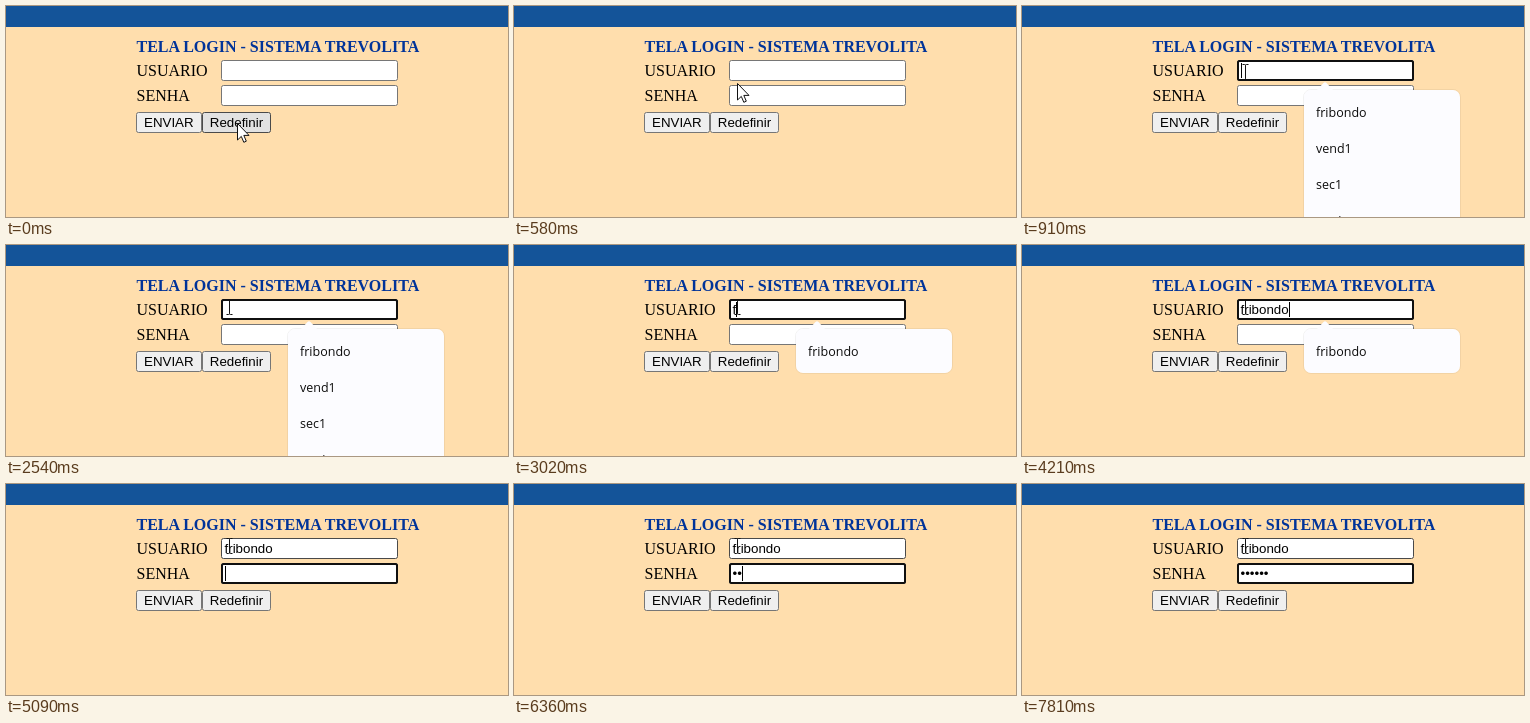
Write an HTML page that moves like this. It is 502 by 211 pixels and loops after 8000 ms.

```html
<!DOCTYPE html>
<html lang="pt">
<head>
<meta charset="utf-8">
<title>Login</title>
<style>
  html, body { margin: 0; width: 100%; height: 100%; overflow: hidden; background: #ffdead; }
  svg { display: block; width: 502px; height: 211px; }
  text { white-space: pre; }
  .serif { font: 16px "Liberation Serif", serif; }
  .title { font-weight: bold; fill: #039; }
  .sans { font: 13.333px "Liberation Sans", sans-serif; }
  .menu text { font: 12.5px "Open Sans", sans-serif; fill: #0c0c0c; }
  .menu path, .menu rect { fill: #fcfcff; }
  .menu .edge { fill: none; stroke: #000; stroke-opacity: .05; }
  .box { fill: #fff; stroke: #767676; }
  .button { fill: #efefef; stroke: #767676; }
  .box.hover { stroke: #4a4a4a; }
  .button.hover { fill: #e2e2e2; stroke: #4a4a4a; }
  .ring { fill: none; stroke: #101010; stroke-width: 2; }
</style>
</head>
<body>
<svg viewBox="0 0 502 211">
  <rect width="502" height="211" fill="#ffdead"/>
  <rect width="502" height="21" fill="#145499"/>

  <text class="serif title" x="130.5" y="46">TELA LOGIN - SISTEMA TREVOLITA</text>
  <text class="serif" x="130.5" y="70">USUARIO</text>
  <text class="serif" x="130.5" y="95">SENHA</text>

  <rect id="user" class="box" x="215.5" y="54.5" width="176" height="20" rx="2"/>
  <rect id="pass" class="box" x="215.5" y="79.5" width="176" height="20" rx="2"/>
  <rect id="ring" class="ring" x="216" width="175" height="19" rx="1.5"/>
  <text id="userText" class="sans" x="218.5" y="69"></text>
  <text id="passText" class="sans" x="218.5" y="94"></text>
  <rect id="caret" width="1" height="15"/>

  <rect class="button" x="130.5" y="106.5" width="65" height="20" rx="2"/>
  <rect id="reset" class="button" x="196.5" y="106.5" width="68" height="20" rx="2"/>
  <text class="sans" x="138" y="121">ENVIAR</text>
  <text class="sans" x="203.8" y="121">Redefinir</text>

  <g id="menu" class="menu">
    <rect id="edge" class="edge" x="281.5" y="83.5" width="157" rx="7.5"/>
    <path d="M294 85L301.5 77Q303 75.6 304.5 77L312 85Z"/>
    <rect id="panel" x="282" y="84" width="156" rx="7"/>
    <text x="294" y="110.5">fribondo</text>
    <g id="more">
      <text x="294" y="146.5">vend1</text>
      <text x="294" y="182.5">sec1</text>
      <text x="294" y="218.5">apoio</text>
    </g>
  </g>

  <path id="arrow" d="M.5 .5V17L4.3 13.4L6.8 19.3L9.3 18.2L6.8 12.4H12Z" fill="#fff" stroke="#111"/>
  <path id="beam" d="M-3 -7.5H-1Q0 -7.5 0 -6.5Q0 -7.5 1 -7.5H3M0 -6.5V6.5M-3 7.5H-1Q0 7.5 0 6.5Q0 7.5 1 7.5H3" fill="none" stroke="#111"/>
</svg>
<script>
const LOOP = 8000;
const NAME = "fribondo";
const moveTimes = [70, 150, 230, 320, 400, 490, 580, 660, 720, 790, 850];
const nameTimes = [3020, 3210, 3350, 3620, 3750, 3880, 3960, 4150];
const dotTimes = [6150, 6360, 6630, 6820, 7150, 7290];
const fadeTimes = [4220, 4280, 4350];
const caretSpans = [[910, 1480], [1960, 2540], [3020, 4680], [5090, 5630], [6150, 7810]];

const $ = id => document.getElementById(id);
const passed = (times, t) => times.filter(at => t >= at).length;
const show = (id, on) => $(id).setAttribute("visibility", on ? "visible" : "hidden");
const within = (v, low, high) => v >= low && v <= high;

function pointer(t) {
  const step = passed(moveTimes, t);
  if (step <= 7) return { x: 231 - 8 * step / 7, y: 117 - 40 * step / 7 };
  if (t >= 2000) return { x: 223.5, y: 62 };
  return { x: 223.5, y: 66 + (11 - step) * 2 };
}

function render(t) {
  const { x, y } = pointer(t);
  const overUser = within(y, 54, 75);
  const overPass = within(y, 79, 100);
  const onPass = t >= 5090;
  const place = `translate(${Math.floor(x) + (overUser || overPass ? .5 : 0)} ${Math.round(y)})`;

  $("arrow").setAttribute("transform", place);
  $("beam").setAttribute("transform", place);
  show("arrow", !overUser && !overPass);
  show("beam", overUser || overPass);
  $("user").classList.toggle("hover", overUser);
  $("pass").classList.toggle("hover", overPass);
  $("reset").classList.toggle("hover", within(y, 106, 127));

  show("ring", t >= 910);
  $("ring").setAttribute("y", onPass ? 80 : 55);

  $("userText").textContent = NAME.slice(0, passed(nameTimes, t));
  $("passText").textContent = "•".repeat(passed(dotTimes, t));
  const active = onPass ? $("passText") : $("userText");
  const end = active.textContent ? active.getComputedTextLength() : 0;
  $("caret").setAttribute("x", Math.round(218.7 + end));
  $("caret").setAttribute("y", onPass ? 82 : 57);
  show("caret", caretSpans.some(([on, off]) => t >= on && t < off));

  const full = t < nameTimes[0];
  const height = full ? 150 : 44;
  show("menu", within(t, 910, 4349));
  $("menu").setAttribute("opacity", 1 - passed(fadeTimes, t) / 3);
  $("panel").setAttribute("height", height);
  $("edge").setAttribute("height", height + 1);
  $("more").setAttribute("display", full ? "inline" : "none");
}

const start = performance.now();
function frame() {
  render((performance.now() - start) % LOOP);
  requestAnimationFrame(frame);
}
frame();
</script>
</body>
</html>
```
